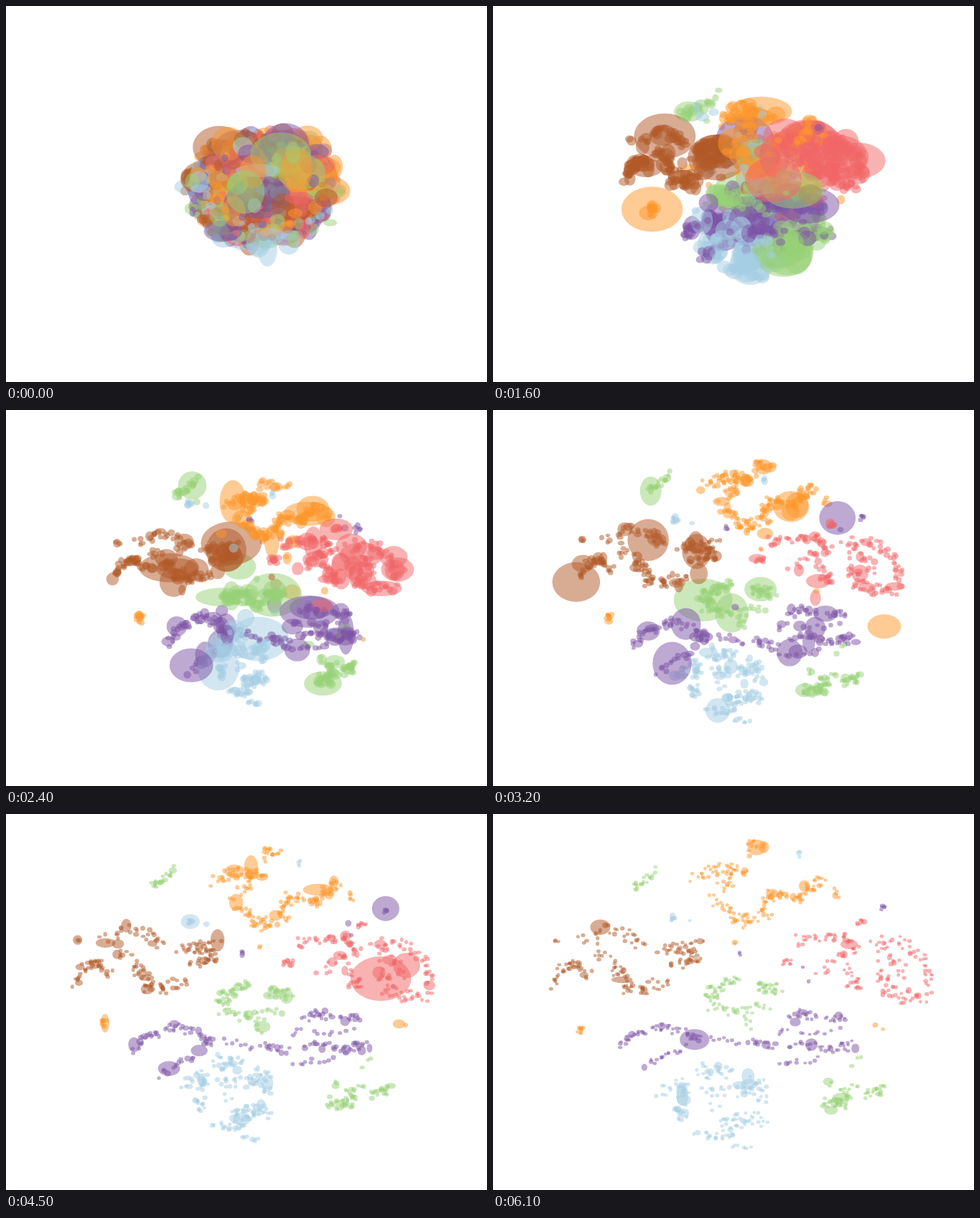
Animation of 670 by 523 pixels, one loop 6.2 s. Source, as an HTML page with a canvas:

```html
<!DOCTYPE html>
<html lang="en">
<head>
<meta charset="utf-8">
<title>Clusters</title>
<style>
html, body { margin: 0; width: 100%; height: 100%; overflow: hidden; background: #fff; }
canvas { display: block; }
</style>
</head>
<body>
<canvas id="stage" width="670" height="523"></canvas>
<script>
const ctx = document.getElementById('stage').getContext('2d');
const LOOP = 6200, STEP = 100;
const [BLUE, GREEN, RED, ORANGE, PURPLE, BROWN] =
  ['#a6cee3', '#98d277', '#f16667', '#fe982c', '#7d54a5', '#b15928'];
const KEYS = [1600, 2400, 3200, 4500, 5300, 6100];
const dots = [];

const rnd = (i, k) => {
  const v = Math.sin(i * 127.1 + k * 311.7) * 43758.5453;
  return v - Math.floor(v);
};
const expo = (i, k) => -Math.log(1 - rnd(i, k) * 0.999);
const lerp = (a, b, f) => a + (b - a) * f;

// Smoothly changing random value, one per dot and channel
function drift(fn, i, k, t) {
  const s = t / 400 + rnd(i, k);
  const a = Math.floor(s);
  return lerp(fn(i, k + a + 1), fn(i, k + a + 2), s - a);
}

function linear(times, vals, t) {
  let j = 0;
  while (j < times.length - 2 && t > times[j + 1]) j++;
  const f = (t - times[j]) / (times[j + 1] - times[j]);
  return lerp(vals[j], vals[j + 1], Math.max(0, Math.min(1, f)));
}

// Cubic curve through the keys of a track
function along(track, c, t) {
  const n = KEYS.length - 1;
  if (t <= KEYS[0]) return track[0][c];
  let j = 0;
  while (j < n - 1 && t > KEYS[j + 1]) j++;
  const slope = k => {
    const a = Math.max(0, k - 1), b = Math.min(n, k + 1);
    return (track[b][c] - track[a][c]) / (KEYS[b] - KEYS[a]);
  };
  const h = KEYS[j + 1] - KEYS[j], f = (t - KEYS[j]) / h, g = 1 - f;
  return track[j][c] * (1 + 2 * f) * g * g + slope(j) * h * f * g * g
    + track[j + 1][c] * f * f * (3 - 2 * f) - slope(j + 1) * h * f * f * g;
}

// track: x, y, x scale, y scale at each key; strokes: count, width, then a polyline
function group(color, track, ...strokes) {
  track = track.map(([x, y, sx = 1, sy = 1]) => [x, y, sx, sy]);
  const [cx, cy] = track[track.length - 1];
  for (const [count, width, ...line] of strokes) {
    const segs = line.length / 2 - 1;
    for (let j = 0; j < count; j++) {
      const i = dots.length + 1;
      const p = (j + rnd(i, 1)) / count * segs;
      const s = Math.min(Math.floor(p), Math.max(0, segs - 1)) * 2;
      const e = segs ? s + 2 : s;
      const r = width * Math.sqrt(rnd(i, 2)), a = rnd(i, 3) * 2 * Math.PI;
      const rho = Math.sqrt(rnd(i, 4)), b = rnd(i, 5) * 2 * Math.PI;
      dots.push({
        i, color, track, rho,
        x: lerp(line[s], line[e], p - s / 2) + r * Math.cos(a) - cx,
        y: lerp(line[s + 1], line[e + 1], p - s / 2) + r * Math.sin(a) - cy,
        x0: 357 + 100 * rho * Math.cos(b) + (cx - 350) * 0.06,
        y0: 254 + 73 * rho * Math.sin(b) + (cy - 250) * 0.06,
        delay: rnd(i, 6) < 0.14 ? Math.min(2600, 700 * expo(i, 7)) : 0,
        z: rnd(i, 8)
      });
    }
  }
}

group(BLUE,
  [[348, 342, .68, .6], [328, 355, .52, .92], [322, 382, .78, .88], [314, 394, .82, 1], [314, 402], [314, 406]],
  [24, 11, 288, 356, 308, 359, 330, 362],
  [32, 13, 372, 372, 345, 386, 366, 374, 386, 406],
  [38, 11, 226, 396, 270, 370, 258, 405, 268, 425],
  [16, 16, 295, 380, 320, 385, 305, 412],
  [36, 11, 318, 432, 345, 427, 375, 424],
  [16, 8, 282, 444, 310, 451, 335, 449],
  [6, 3, 332, 462, 362, 464]);
group(BLUE, [[284, 142], [253, 130], [252, 153], [255, 150], [253, 148], [250, 145]],
  [7, 4, 246, 144, 253, 146], [1, 1, 274, 149]);
group(BLUE, [[375, 150], [372, 118], [380, 97], [410, 69], [424, 61], [428, 56]], [3, 4, 428, 56]);

group(GREEN,
  [[368, 266, 1.2, .55], [342, 261, .85, .35], [338, 263, 1, .9], [344, 260], [346, 258], [346, 253]],
  [42, 9, 300, 264, 310, 240, 345, 227],
  [26, 8, 368, 238, 395, 245],
  [26, 8, 305, 268, 340, 276, 385, 268],
  [4, 5, 348, 284, 360, 294]);
group(GREEN,
  [[430, 328, .8, 1], [458, 366, .62, 1], [470, 381, .9, .9], [490, 393], [497, 392], [500, 393]],
  [30, 9, 458, 400, 478, 406, 498, 398],
  [19, 7, 520, 390, 546, 382],
  [13, 7, 462, 376, 490, 386, 510, 374]);
group(GREEN, [[288, 141, 1.6, 1.2], [250, 110], [230, 103], [218, 91], [214, 91], [210, 93]],
  [20, 5, 195, 101, 210, 95, 227, 78]);
group(GREEN, [[455, 300], [470, 305], [485, 330], [502, 345], [506, 344], [506, 343]],
  [3, 3, 513, 336, 499, 350]);

group(RED,
  [[458, 214, .6, .75], [468, 212, .86, .78], [480, 212, .98, .86], [503, 211, 1, .95], [514, 210], [520, 210]],
  [38, 8, 420, 176, 460, 173, 492, 168, 510, 196],
  [38, 9, 530, 176, 575, 181, 603, 205, 612, 248],
  [38, 12, 545, 212, 548, 245, 570, 256, 598, 252],
  [32, 9, 456, 220, 490, 195, 500, 238, 515, 234],
  [16, 14, 540, 195, 575, 220],
  [8, 4, 402, 207, 418, 206], [7, 3, 505, 151, 518, 150]);

group(ORANGE,
  [[384, 188, .68, 1.15], [372, 150, .7, .75], [372, 128, .85, .95], [378, 118, .96, 1], [373, 117], [371, 113]],
  [48, 10, 280, 90, 315, 74, 348, 80, 318, 102],
  [28, 9, 304, 116, 330, 140, 355, 154],
  [42, 10, 345, 152, 380, 138, 385, 112, 412, 116],
  [32, 9, 418, 122, 438, 105, 458, 90],
  [5, 8, 478, 112]);
group(ORANGE, [[372, 152, 1.5, 1], [368, 105, 1.8, 1], [373, 78], [367, 54], [364, 47], [363, 44]],
  [14, 7, 352, 44, 376, 43], [1, 1, 358, 58]);
group(ORANGE, [[222, 283, 1.3, 1.3], [188, 289, 1.3, 1], [163, 288], [137, 290], [127, 294], [123, 300]],
  [11, 6, 123, 300]);
group(ORANGE, [[480, 270], [494, 315], [540, 298], [551, 291], [548, 293], [538, 295]],
  [2, 4, 533, 292, 544, 297]);
group(ORANGE, [[350, 205], [390, 205], [372, 195], [352, 185], [344, 182], [337, 179]],
  [2, 3, 331, 179, 342, 179]);

group(PURPLE,
  [[335, 322, .66, 1], [308, 324, .78, 1.5], [293, 328, .94, 1.35], [282, 328, 1, 1.3], [281, 325, 1, 1.15], [282, 321]],
  [72, 6, 176, 321, 200, 307, 232, 297, 270, 304, 285, 315, 360, 317, 394, 321],
  [16, 5, 212, 349, 240, 338, 268, 323]);
group(PURPLE,
  [[410, 305, 1.1, .9], [442, 303, .88, .8], [448, 307, 1, .9], [450, 310], [448, 312], [448, 310]],
  [18, 8, 416, 286, 432, 277, 448, 282],
  [11, 5, 464, 283, 494, 286],
  [32, 7, 415, 321, 470, 326, 502, 323],
  [10, 6, 393, 345, 425, 346, 454, 341],
  [12, 10, 385, 302, 440, 302, 490, 304]);
group(PURPLE, [[452, 168, 1.5, 1], [490, 164, 2, 1.5], [514, 148], [529, 134], [537, 131], [544, 129]],
  [5, 4, 544, 129]);
group(PURPLE, [[350, 180], [340, 155, 2, 1], [325, 166, 2, 1], [329, 195], [338, 198], [344, 196]],
  [3, 4, 344, 196]);
group(PURPLE, [[445, 180], [470, 155], [484, 158], [481, 160], [464, 180], [438, 222]],
  [2, 5, 434, 209, 440, 234]);

group(BROWN,
  [[252, 212, .64, .85], [236, 206, .82, .75], [216, 206, .94, .88], [196, 204, .97, .98], [190, 206], [186, 205]],
  [38, 8, 82, 240, 98, 212, 116, 206, 132, 226],
  [30, 9, 122, 178, 155, 158, 190, 170, 206, 184],
  [46, 8, 234, 188, 262, 186, 284, 200, 250, 214],
  [56, 10, 142, 188, 175, 212, 182, 240, 208, 243, 240, 232],
  [8, 8, 276, 190, 288, 178],
  [3, 3, 88, 176]);

dots.sort((a, b) => a.z - b.z);

const AGES = [0, ...KEYS];
const BASE = [4, 4.8, 3.9, 3.3, 2.9, 2.8, 2.6];
const GAIN = [11, 3, 0.75, 0.45, 0.22, 0.16, 0.13];
const POWER = [1, 1.9, 2.6, 2.8, 2.8, 2.8, 2.8];
const WANDER = [14, 7, 3, 3, 3, 3, 3];

function drawDot(d, t) {
  const { i, track } = d;
  const age = Math.max(0, t - d.delay);
  const mix = Math.min(1, age / 1600) ** 2;
  const at = vals => linear(AGES, vals, age);
  const x = along(track, 0, t) + d.x * along(track, 2, t);
  const y = along(track, 1, t) + d.y * along(track, 3, t);
  const sway = k => (drift(rnd, i, k, t) - 0.5) * at(WANDER);

  const rim = lerp(1.2 - 0.65 * d.rho, 1, mix);
  const surge = at(GAIN) * drift(expo, i, 300, t) ** at(POWER) * rim;
  const radius = (k, top) => at(BASE) * lerp(0.8, 1.2, drift(rnd, i, k, t))
    + Math.min(top, surge * lerp(0.25, 1.5, drift(rnd, i, k + 50, t)));

  ctx.fillStyle = d.color;
  ctx.beginPath();
  ctx.ellipse(lerp(d.x0, x, mix) + sway(100), lerp(d.y0, y, mix) + sway(200),
    radius(400, 38), radius(500, 30) * 0.9, 0, 0, 2 * Math.PI);
  ctx.fill();
}

function render(t) {
  ctx.globalAlpha = 1;
  ctx.fillStyle = '#fff';
  ctx.fillRect(0, 0, 670, 523);
  ctx.globalAlpha = 0.5;
  for (const d of dots) drawDot(d, t);
}

const start = performance.now();
let shown = -1;
function tick() {
  const t = Math.floor((performance.now() - start) % LOOP / STEP) * STEP;
  if (t !== shown) render(shown = t);
  requestAnimationFrame(tick);
}
tick();
</script>
</body>
</html>
```
